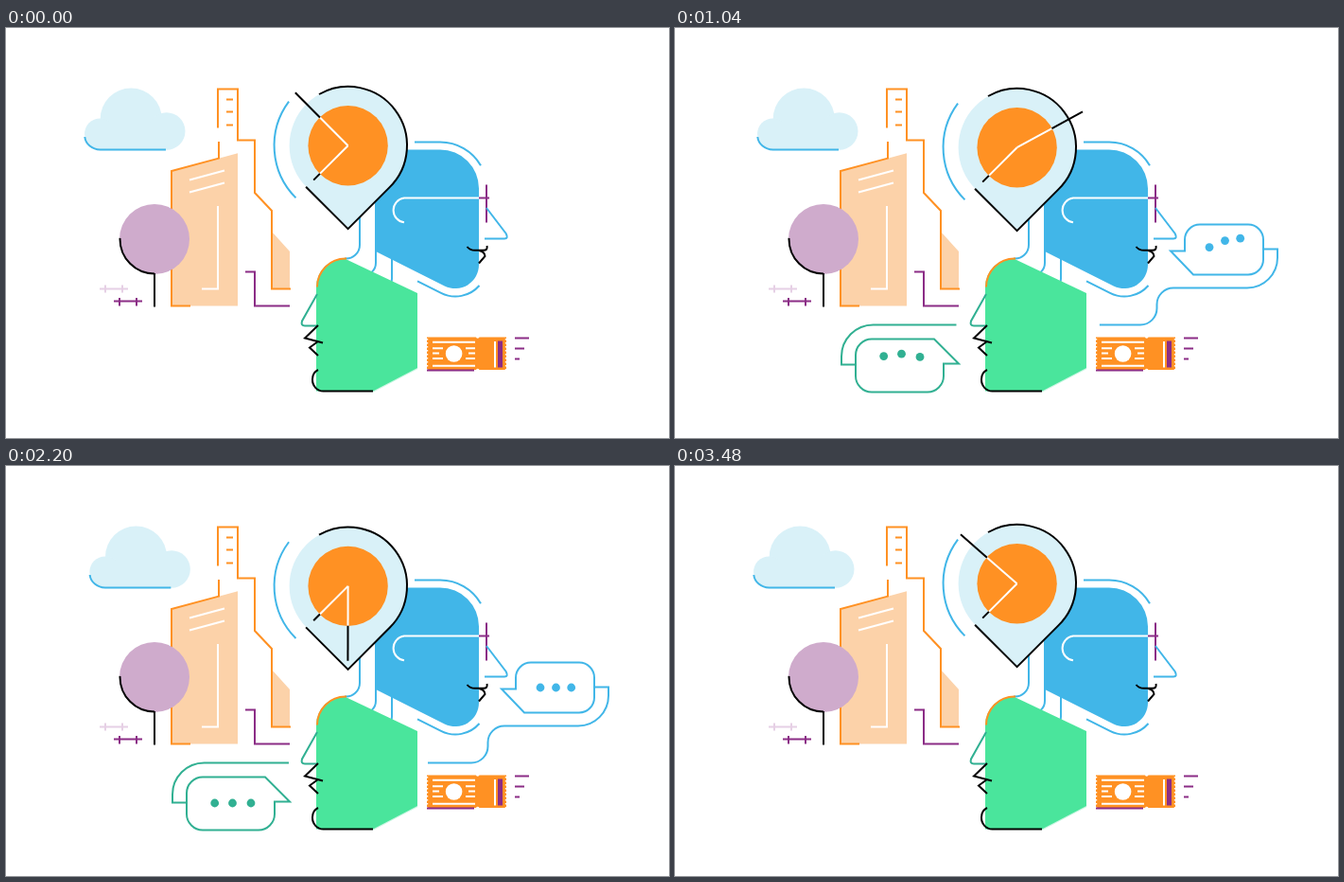
An HTML page with a canvas for the animation above (3520 ms loop, 701x433 px).

```html
<!DOCTYPE html>
<html lang="en">
<head>
<meta charset="utf-8">
<title>City talk</title>
<style>
  html, body { margin: 0; width: 100%; height: 100%; overflow: hidden; background: #fff; }
  canvas { display: block; width: 701px; height: 433px; }
</style>
</head>
<body>
<canvas id="stage" width="701" height="433"></canvas>
<script>
const ctx = document.getElementById('stage').getContext('2d');
const LOOP = 3520;
const TAU = Math.PI * 2;
const ORANGE = '#ff9123', PEACH = '#fcd2a9', BLUE = '#41b6e8', PALE = '#d9f1f8';
const MAUVE = '#cfabcc', PURPLE = '#8b2d86', LILAC = '#e6d0e5';
const GREEN = '#4ae59c', TEAL = '#31b092', BLACK = '#000', WHITE = '#fff';

// Easing
const clamp = u => Math.max(0, Math.min(1, u));
const inOut = u => (1 - Math.cos(Math.PI * clamp(u))) / 2;
const out = u => Math.sin(Math.PI / 2 * clamp(u));
const softOut = u => (inOut(u) + out(u)) / 2;
const span = (t, start, length) => clamp((t - start) / length);

// Drawing helpers
function fill(path, color) {
  ctx.fillStyle = color;
  ctx.fill(new Path2D(path));
}

function line(path, color, width = 2) {
  ctx.strokeStyle = color;
  ctx.lineWidth = width;
  ctx.stroke(new Path2D(path));
}

function disc(x, y, r, color) {
  ctx.fillStyle = color;
  ctx.beginPath();
  ctx.arc(x, y, r, 0, TAU);
  ctx.fill();
}

function arc(x, y, r, from, to, color) {
  ctx.strokeStyle = color;
  ctx.lineWidth = 2;
  ctx.beginPath();
  ctx.arc(x, y, r, from, to);
  ctx.stroke();
}

function shifted(x, y, draw) {
  ctx.save();
  ctx.translate(x, y);
  draw();
  ctx.restore();
}

function city() {
  fill('M175 151.2L245 132.2V293.5H175Z M281 215L300 236V275.5H281Z', PEACH);
  line('M224 105.5V64.5H245V118.5H263V174L281 193V275.5H301', ORANGE);
  line('M233 75.5H240M233 88.5H240M233 102.5H240', ORANGE);
  line('M225 120V137.6L175 151V293.5H195', ORANGE);
  line('M194 160.5L231 150.5M194 173.5L231 163.5M224 188V275.5H207', WHITE);
  line('M253 257.5H263V293.5H300', PURPLE);
}

function park() {
  disc(157, 223, 37, MAUVE);
  arc(157, 223, 36.5, Math.PI / 2, Math.PI * 1.01, BLACK);
  line('M157 259V294.5', BLACK);
  line('M99 275.5H129M105 271.5V279.5M123 271.5V279.5', LILAC);
  line('M114 288.5H144M120 285V293.5M138 285V293.5', PURPLE);
}

function cloud() {
  disc(132.2, 96, 32.5, PALE);
  disc(99.5, 112, 16.5, PALE);
  disc(169.7, 109, 19.8, PALE);
  ctx.fillRect(99.5, 100, 70, 28.5);
  line('M83.3 115A16.5 15 0 0 0 99.5 128.5H169', BLUE);
}

function blueHead() {
  fill('M390 128.5H459A41 41 0 0 1 500 169.5V250A25 25 0 0 1 463.7 272.4L390 235.5Z', BLUE);
  line('M432 120.5H459A49.5 49.5 0 0 1 502 145.3', BLUE);
  line('M435 267.3L460 279.8A33.5 33.5 0 0 0 500.5 272', BLUE);
  line('M374 195V229A14.5 14.5 0 0 1 358 243.5', BLUE);
  line('M391 235V248A13.5 13.5 0 0 1 377 261.5M408 243V264.5A14 14 0 0 1 394 278.5', BLUE);
  line('M501 179.5H421A13 13 0 0 0 421 205.3', WHITE);
  line('M508 165.5V205.5M500 179.5H511', PURPLE);
  line('M508 190L528.6 217Q531.5 222.5 527 222.5H506', BLUE);
  line('M487.5 231Q490.5 234.8 496 234.8H505Q509.5 234.8 508.5 230', BLACK);
  line('M500 235Q506 236 506.5 241L500 248.5', BLACK);
}

function greenHead() {
  line('M388 383.5L435 359', '#c9f6e2');
  fill('M328 273.5A30 30 0 0 1 358 243.5L435 280V359L388 383.5H328Z', GREEN);
  line('M329 273.5A30 30 0 0 1 360 243.5', ORANGE);
  line('M329 281L313 309.5Q311.5 314.5 316 314.5H330', TEAL);
  line('M330 314L316 327.5L335 332.5M330 331L321 337.5L330 346', BLACK);
  line('M330 361Q324 364 324 371A11.5 12 0 0 0 335.5 383.5H388', BLACK);
}

function ticket() {
  ctx.fillStyle = ORANGE;
  ctx.fillRect(445, 326.5, 84, 34.5);
  ctx.setLineDash([1.6, 2.4]);
  line('M445.3 328V361M528.7 328V361', WHITE, 1.8);
  ctx.setLineDash([]);
  disc(498.7, 326, 1.8, WHITE);
  disc(498.7, 361.5, 1.8, WHITE);
  disc(473.6, 344, 8.8, WHITE);
  line('M451 331.8H496M451 356.8H496', WHITE);
  line('M451 338.2H462M451 343.6H458M451 349H462M486 338.2H496M489 343.6H496M486 349H496', WHITE);
  line('M517 331V358.5', WHITE);
  line('M522.5 330.5V358.5', PURPLE, 5);
  line('M445 361.5H495M538 327.5H553M538 338.5H548M538 349.5H543', PURPLE);
}

// A hand is white over the clock face and black beyond it.
function hand(angle, length) {
  const dx = Math.sin(angle), dy = -Math.cos(angle);
  line(`M0 0L${dx * 42} ${dy * 42}`, WHITE);
  line(`M${dx * 42} ${dy * 42}L${dx * length} ${dy * length}`, BLACK);
}

function pin(t) {
  fill('M-43.8 43.8A62 62 0 1 1 43.8 43.8L0 87.7Z', PALE);
  arc(0, 0, 78, TAU * 0.375, TAU * 0.602, BLUE);
  line('M-44.5 43.5L0 88L43.8 44.2A62.2 62.2 0 0 0 -30.6 -54.2', BLACK);
  disc(0, 0, 42.2, ORANGE);
  hand(TAU * 0.625, 51.5);
  hand(TAU * (0.875 + t / LOOP), 79);
}

// Two slow swings of 800 ms each way, then a rest.
function drift(t) {
  if (t >= 3200) return 0;
  const rise = softOut(t % 800 / 800);
  return t % 1600 < 800 ? rise : 1 - rise;
}

function hop(t, start) {
  const p = t - start;
  if (p < 0 || p > 2000) return 0;
  const q = p % 800;
  return 12 * (q < 200 ? out(q / 200) : 1 - inOut((q - 200) / 200));
}

function popScale(t, open, close) {
  const grow = 1.1 * inOut(span(t, open, 320)) - 0.1 * inOut(span(t, open + 320, 200));
  const swell = 1 + 0.1 * inOut(span(t, close, 140));
  return grow * swell * (1 - inOut(span(t, close + 140, 430)));
}

const bubbles = [
  {
    color: BLUE, x: 519, y: 236, open: 80, close: 2800, retract: 2320, hopStart: 700,
    body: 'M539 235.5H524L548 260.5H606A16 16 0 0 0 622 244.5V223.5A16 16 0 0 0 606 207.5H555A16 16 0 0 0 539 223.5Z',
    trail: 'M622 233.5H637V242.5A32 32 0 0 1 605 274.5H527A17.5 17.5 0 0 0 509.5 292V296A17.5 17.5 0 0 1 492 313.5H446',
    trailLength: 257, dots: [565, 581.5, 597.7], dotY: 234
  },
  {
    color: TEAL, x: 304.5, y: 356, open: 160, close: 2920, retract: 2485, hopStart: 780,
    body: 'M284 354.5H300L274 328.5H208A17 17 0 0 0 191 345.5V367.5A17 17 0 0 0 208 384.5H267A17 17 0 0 0 284 367.5Z',
    trail: 'M191 355.5H176V347A33.5 33.5 0 0 1 209.5 313.5H299',
    trailLength: 166, dots: [220.7, 239.5, 259], dotY: 356
  }
];

function bubble(b, t) {
  const scale = popScale(t, b.open, b.close);
  if (scale < 0.002) return;
  ctx.save();
  ctx.translate(b.x, b.y);
  ctx.scale(scale, scale);
  ctx.translate(-b.x, -b.y);

  const drawn = inOut(span(t, 520, 560)) - inOut(span(t, b.retract, 560));
  if (drawn > 0.001) {
    ctx.setLineDash([b.trailLength * drawn, 1000]);
    line(b.trail, b.color);
    ctx.setLineDash([]);
  }
  fill(b.body, WHITE);
  line(b.body, b.color);
  b.dots.forEach((x, i) => disc(x, b.dotY - hop(t, b.hopStart + i * 80), 4.4, b.color));
  ctx.restore();
}

function render(now) {
  const t = now % LOOP;
  const sway = drift(t);
  ctx.fillStyle = WHITE;
  ctx.fillRect(0, 0, 701, 433);
  city();
  park();
  shifted(6 * sway, 0, cloud);
  blueHead();
  greenHead();
  ticket();
  shifted(361.6, 124.2 + 3 * sway, () => pin(t));
  bubbles.forEach(b => bubble(b, t));
}

const began = performance.now();
function tick() {
  render(performance.now() - began);
  requestAnimationFrame(tick);
}
tick();
</script>
</body>
</html>
```
